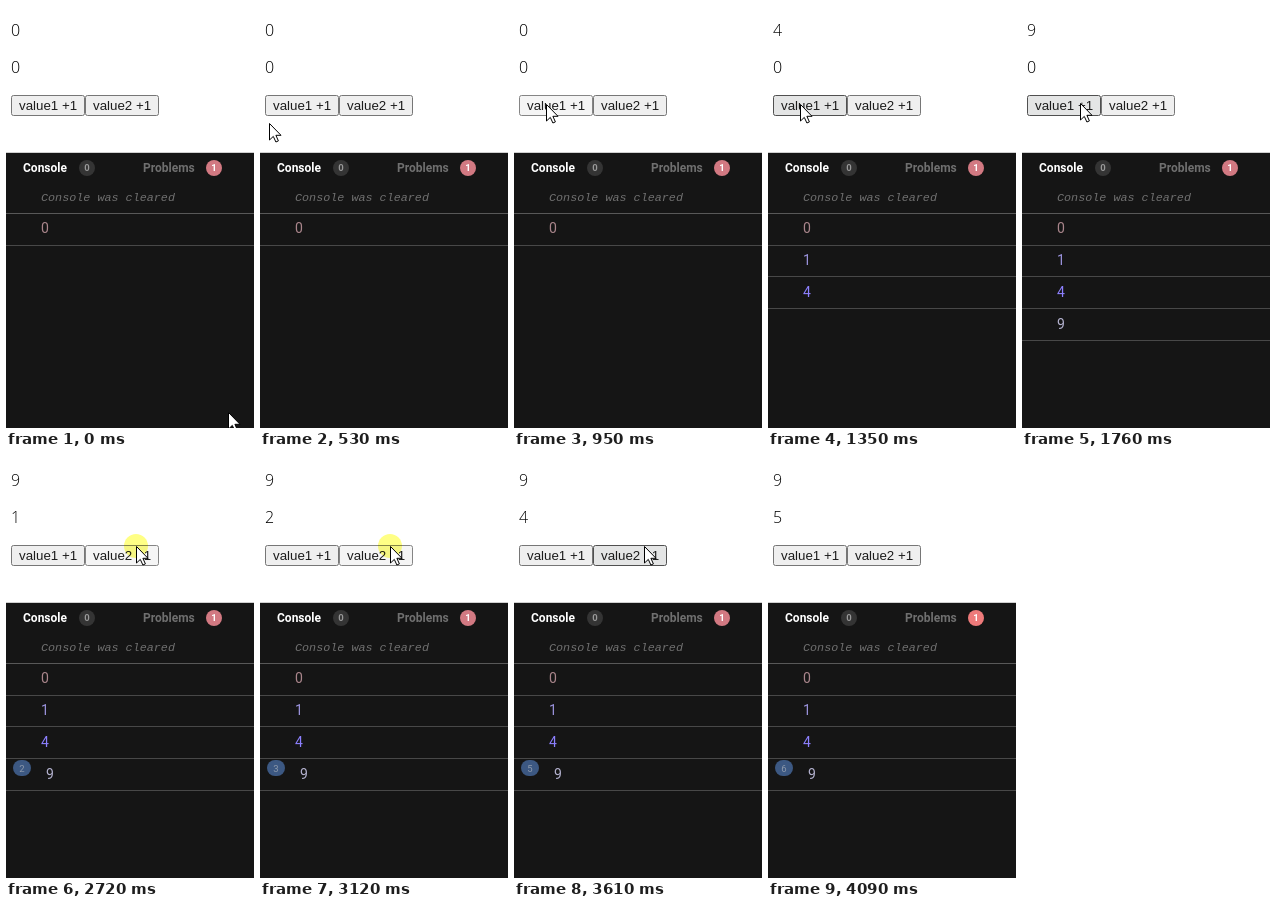
Write an HTML page that moves like this. It is 248x422 px and loops after 4820 ms.

```html
<!DOCTYPE html>
<html lang="en">
<head>
<meta charset="utf-8">
<title>Counter and console</title>
<style>
  html, body { margin: 0; width: 100%; height: 100%; overflow: hidden; background: #fff; }
  svg { display: block; width: 248px; height: 422px; }
  text { white-space: pre; }
  .value { font: 300 16px "Open Sans", "Noto Sans", sans-serif; fill: #000; }
  .label { font: 13.333px "Liberation Sans", Arial, sans-serif; fill: #1c1c1c; }
  .tab { font: bold 12px Roboto, sans-serif; }
  .count { font: bold 9.5px Roboto, sans-serif; text-anchor: middle; }
  .cleared { font: italic 11.75px "Liberation Mono", monospace; fill: #707070; }
  .log { font: 14px Roboto, sans-serif; }
  .glow { mix-blend-mode: multiply; }
</style>
</head>
<body>
<svg viewBox="0 0 248 422">
  <rect width="248" height="422" fill="#fff"/>
  <text id="value1" class="value" x="5" y="30">0</text>
  <text id="value2" class="value" x="5" y="67">0</text>
  <g id="buttons"></g>

  <rect y="146" width="248" height="1" fill="#d0d0d0"/>
  <rect y="147" width="248" height="275" fill="#151515"/>
  <text class="tab" x="17" y="166" fill="#fff">Console</text>
  <circle cx="81" cy="162" r="8" fill="#343434"/>
  <text class="count" x="81" y="165.4" fill="#999">0</text>
  <text class="tab" x="137" y="166" fill="#6f6f6f">Problems</text>
  <circle id="alert" cx="208" cy="162" r="8"/>
  <text class="count" x="208" y="165.4" fill="#fff">1</text>
  <text class="cleared" x="35" y="194.5">Console was cleared</text>
  <rect y="207" width="248" height="1" fill="#585858"/>
  <g id="rows"></g>
  <g id="repeat">
    <rect x="7" y="304" width="18" height="16" rx="8" fill="#3c5882"/>
    <text id="times" class="count" x="16" y="315.5" fill="#8d99ab" style="font-weight:400"></text>
  </g>

  <g id="pointer">
    <circle id="glow" class="glow" r="12" fill="#ffff85"/>
    <path d="M.5.5V17L4.3 13.4L6.9 19L9.4 17.9L6.9 12.3H12Z" fill="#fff" stroke="#000"/>
  </g>
</svg>
<script>
const LOOP = 4820, STEP = 70, HOLD = 130, LEAVE = 4090;

// Pointer legs: each bends from one point to the next through a control point
const LEGS = [
  { start: 70, end: 560, from: [222, 406], via: [80, 170], to: [9, 117] },
  { start: 600, end: 1020, from: [9, 117], via: [20, 100], to: [32, 98] },
  { start: 1760, end: 2250, from: [32, 98], via: [80, 96], to: [130, 90] },
  { start: 4020, end: 4090, from: [130, 90], via: [165, 120], to: [203, 152] }
];
// Steady clicks on the first button, quickening ones on the second
const DOWNS = [
  Array.from({ length: 3 }, (_, k) => 890 + 330 * k),
  Array.from({ length: 5 }, (_, k) => 2260 + 470 * k - 22 * k * k)
];
const LOG_COLORS = ["#a9858b", "#9a92dc", "#8d80ff", "#b4b2cf"];
const LOOKS = {
  idle: ["#efefef", "#767676"],
  hover: ["#e4e5e5", "#505050"],
  down: ["#f5f5f5", "#858585"]
};

const $ = id => document.getElementById(id);

function add(parent, tag, attrs, text) {
  const el = document.createElementNS("http://www.w3.org/2000/svg", tag);
  for (const key in attrs) el.setAttribute(key, attrs[key]);
  if (text !== undefined) el.textContent = text;
  parent.append(el);
  return el;
}

function show(el, on) {
  el.setAttribute("visibility", on ? "visible" : "hidden");
}

const buttons = DOWNS.map((downs, i) => {
  const x = 5 + 74 * i;
  const box = add($("buttons"), "rect", { x: x + .5, y: 89.5, width: 73, height: 20, rx: 2 });
  add($("buttons"), "text", { class: "label", x: x + 8, y: 104 }, `value${i + 1} +1`);
  return { x, box, downs };
});

const rows = LOG_COLORS.map((fill, i) => {
  const g = add($("rows"), "g", {});
  const text = add(g, "text", { class: "log", x: 35, y: 226.5 + 32 * i, fill }, i * i);
  add(g, "rect", { y: Math.round(238.7 + 31.7 * i), width: 248, height: 1, fill: "#484848" });
  return { g, text };
});

function pointerAt(t) {
  const leg = LEGS.findLast(l => l.start <= t);
  if (!leg) return { x: LEGS[0].from[0], y: LEGS[0].from[1], resting: true };
  const steps = Math.floor((t - leg.start) / STEP) + 1;
  const p = Math.min(1, steps * STEP / (leg.end - leg.start));
  const u = 1 - (1 - p) ** 2;
  const [x, y] = leg.from.map((a, i) =>
    Math.round((1 - u) ** 2 * a + 2 * u * (1 - u) * leg.via[i] + u * u * leg.to[i]));
  return { x, y, resting: t >= leg.end };
}

function render(t) {
  const { x, y, resting } = pointerAt(t);
  const [n1, n2] = DOWNS.map(downs => downs.filter(d => d + HOLD <= t).length);
  const present = t < LEAVE;
  let pressed = false;

  $("value1").textContent = n1 * n1;
  $("value2").textContent = n2;
  $("times").textContent = n2 + 1;
  rows.forEach((row, i) => show(row.g, i <= n1));
  rows[3].text.setAttribute("x", n2 ? 40 : 35);
  show($("repeat"), n2 > 0);

  for (const b of buttons) {
    const down = b.downs.some(d => d <= t && t < d + HOLD);
    const over = present && x >= b.x && x < b.x + 74 && y >= 89 && y < 110;
    const [fill, stroke] = LOOKS[down ? "down" : over ? "hover" : "idle"];
    b.box.setAttribute("fill", fill);
    b.box.setAttribute("stroke", stroke);
    pressed ||= down;
  }

  $("alert").setAttribute("fill", present ? "#d27982" : "#ee7a7a");
  $("pointer").setAttribute("transform", `translate(${x} ${y})`);
  show($("pointer"), present);
  show($("glow"), present && pressed && resting);
}

const start = performance.now();
function tick(now) {
  render(Math.max(0, now - start) % LOOP);
  requestAnimationFrame(tick);
}
render(0);
requestAnimationFrame(tick);
</script>
</body>
</html>
```
